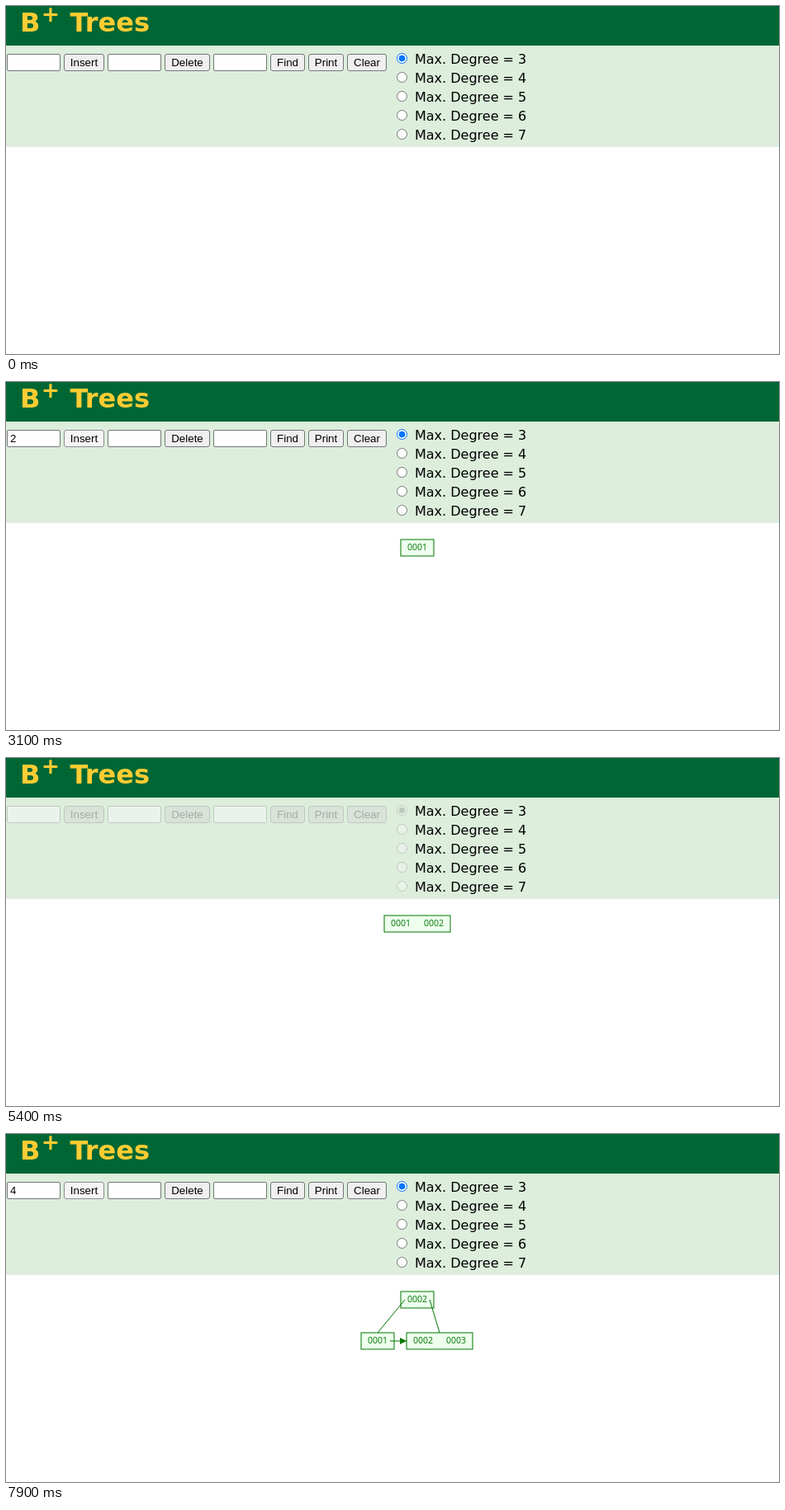
Write an HTML page that moves like this. It is 936 by 422 pixels and loops after 8000 ms.

```html
<!DOCTYPE html>
<html lang="en">
<head>
<meta charset="utf-8">
<title>B+ Trees</title>
<style>
  html, body { margin: 0; width: 100%; height: 100%; overflow: hidden; background: #fff; }
  #stage { position: absolute; left: 0; top: 0; width: 936px; height: 422px; overflow: hidden; }
  header { position: absolute; width: 936px; height: 48px; background: #063; }
  #panel { position: absolute; top: 48px; width: 936px; height: 123px; background: #ded; }
  svg { position: absolute; left: 0; top: 0; }

  .title { font: bold 32px "DejaVu Sans", Verdana, sans-serif; fill: #fc3; }
  .title .sup { font-size: 26.67px; }
  .degree { font: 16px "DejaVu Sans", Verdana, sans-serif; }

  .box {
    position: absolute; top: 58px; height: 21px; box-sizing: border-box;
    border: 1px solid #767676; border-radius: 2px;
    font: 13.333px/19px "Liberation Sans", Arial, sans-serif; color: #000; white-space: pre;
  }
  .field { width: 65px; padding-left: 3px; background: #fff; }
  .button { border-radius: 3px; background: #efefef; text-align: center; }
  .field.hover { border-color: #4f4f4f; }
  .field.focus { outline: 2px solid #101010; outline-offset: -1px; }
  .button.hover { background: #e5e5e5; border-color: #4f4f4f; }
  .button.active { background: #f5f5f5; border-color: #8d8d8d; }

  .ring { fill: #fff; stroke: #767676; }
  .ring.on { stroke: #0075ff; }
  .dot { fill: #0075ff; }

  .off .box { border-color: #bfcabf; }
  .off .field { background: #ebf2eb; }
  .off .button { background: #d9e3d9; color: #a6aaa6; }
  .off .ring { fill: #e9f2e9; stroke: #bfcabf; }
  .off .dot { fill: #bfc8bf; }

  #tree text { font: 10.5px "Open Sans", "Noto Sans", sans-serif; }
  .key { fill: #070; text-anchor: middle; }
  .node { fill: #efe; stroke: #070; }
  .halo { fill: #f00; }
  .edge { fill: none; stroke: #070; }
  .head { fill: #070; }
</style>
</head>
<body>
<div id="stage">
  <header></header>
  <div id="panel"></div>
  <svg id="labels" width="936" height="171">
    <g class="title">
      <text x="17" y="31">B</text>
      <text class="sup" x="42.8" y="18.5">+</text>
      <text x="77.5" y="31">Trees</text>
    </g>
  </svg>
  <div id="controls"></div>
  <svg id="tree" width="936" height="422"></svg>
</div>
<script>
const LOOP = 8000, TICK = 100;
const $ = id => document.getElementById(id);
const stage = $("stage"), controls = $("controls"), tree = $("tree");

function addBox(kind, x, width, text = "") {
  const el = document.createElement("div");
  el.className = "box " + kind;
  el.style.left = x + "px";
  if (width) el.style.width = width + "px";
  el.textContent = text;
  controls.append(el);
  return el;
}

const field = addBox("field", 1);
const insert = addBox("button", 70, 49, "Insert");
addBox("field", 123);
addBox("button", 192, 55, "Delete");
addBox("field", 251);
addBox("button", 320, 42, "Find");
addBox("button", 366, 43, "Print");
addBox("button", 413, 48, "Clear");

let radios = "";
for (let i = 0; i < 5; i++) {
  const y = 63.5 + 23 * i;
  radios += `<circle class="ring${i ? "" : " on"}" cx="479.5" cy="${y}" r="6"/>`;
  if (!i) radios += `<circle class="dot" cx="479.5" cy="${y}" r="3.8"/>`;
  radios += `<text class="degree" x="495" y="${y + 6.5}">Max. Degree = ${i + 3}</text>`;
}
$("labels").insertAdjacentHTML("beforeend", radios);

const idle = { field: "", value: "", button: "", off: false, msg: "", keys: 0, lit: false, split: false };
const press = { off: true, field: "", value: "", button: "" };

// Each entry changes only the properties it names.
const events = [
  [300, { button: "hover" }],
  [500, { button: "", field: "hover" }],
  [800, { field: "focus" }],
  [900, { value: "1", button: "hover" }],
  [1100, press],
  [1200, { msg: "Inserting 0001" }],
  [1500, { msg: "", keys: 1 }],
  [1600, { off: false }],
  [2500, { field: "hover" }],
  [2800, { field: "focus" }],
  [2900, { value: "2" }],
  [3000, { button: "hover" }],
  [3100, { button: "active", field: "" }],
  [3200, { ...press, msg: "Inserting 0002" }],
  [3600, { lit: true }],
  [3900, { lit: false, msg: "", keys: 2 }],
  [4300, { off: false, button: "hover" }],
  [4500, { button: "", field: "hover" }],
  [4700, { field: "focus" }],
  [4900, { value: "3" }],
  [5000, { button: "hover" }],
  [5400, press],
  [5500, { msg: "Inserting 0003" }],
  [5800, { lit: true }],
  [6200, { keys: 3, msg: "Node now contains too many keys.  Splitting ..." }],
  [6500, { lit: false, msg: "", split: true }],
  [6800, { off: false, button: "hover" }],
  [7200, { button: "", field: "hover" }],
  [7400, { field: "focus" }],
  [7600, { value: "4" }],
  [7700, { button: "hover" }],
  [7900, { button: "active", field: "" }]
];

function stateAt(t) {
  const s = { ...idle };
  for (const [at, change] of events) if (at <= t) Object.assign(s, change);
  return s;
}

const makeNode = (x, y, ...keys) => {
  const half = keys.length * 20;
  return { x, y, keys, left: x - half, right: x + half, top: y - 10 };
};

const rect = (cls, n, grow = 0) =>
  `<rect class="${cls}" x="${n.left - grow}" y="${n.top - grow}" ` +
  `width="${n.right - n.left + 2 * grow}" height="${20 + 2 * grow}"/>`;

function drawNode(n, halo) {
  const texts = n.keys.map((k, i) =>
    `<text class="key" x="${n.left + 20 + 40 * i}" y="${n.y + 3}">000${k}</text>`);
  return (halo ? rect("halo", n, halo) : "") + rect("node", n) + texts.join("");
}

// Side of a node where an incoming edge ends.
function attach(n, x, y) {
  if (y < n.top) return [n.x, n.top];
  return [x < n.left ? n.left : n.right, n.y];
}

function drawEdge(x, y, to, arrow) {
  const [ex, ey] = attach(to, x, y);
  const line = `<path class="edge" d="M${x} ${y}L${ex} ${ey}"/>`;
  return line + (arrow ? `<path class="head" d="M${ex} ${ey}l-8 -4v8z"/>` : "");
}

function drawSplit(t) {
  const p = Math.min(1, (t - 6450) / 277);
  const y = 201 + 50 * p;
  const root = makeNode(498, 201, 2);
  const low = makeNode(498 - 48 * p, y, 1);
  const high = makeNode(498 + 27 * p, y, 2, 3);
  return drawNode(low) + drawNode(high) + drawNode(root) +
    drawEdge(low.right - 5, y, high, true) +
    drawEdge(root.left + 5, 201, low) +
    drawEdge(root.right - 5, 201, high);
}

// The halo swells and shrinks between 3 and 7 pixels.
const pulse = t => {
  const d = (t + 50) % 2000;
  return 3 + 4 * Math.min(d, 2000 - d) / 1000;
};

function drawTree(s, t) {
  let out = "";
  if (s.split) out = drawSplit(t);
  else if (s.keys) out = drawNode(makeNode(498, 201, ...[1, 2, 3].slice(0, s.keys)), s.lit && pulse(t));
  if (s.msg) out += `<text x="3" y="189" xml:space="preserve">${s.msg}</text>`;
  return out;
}

function render(t) {
  const s = stateAt(t);
  stage.className = s.off ? "off" : "";
  field.className = "box field " + s.field;
  field.textContent = s.value;
  insert.className = "box button " + s.button;
  tree.innerHTML = drawTree(s, t);
}

let start, last = 0;
function frame(now) {
  start ??= now;
  const t = Math.floor(((now - start) % LOOP) / TICK) * TICK;
  if (t !== last) render(last = t);
  requestAnimationFrame(frame);
}
render(0);
requestAnimationFrame(frame);
</script>
</body>
</html>
```
